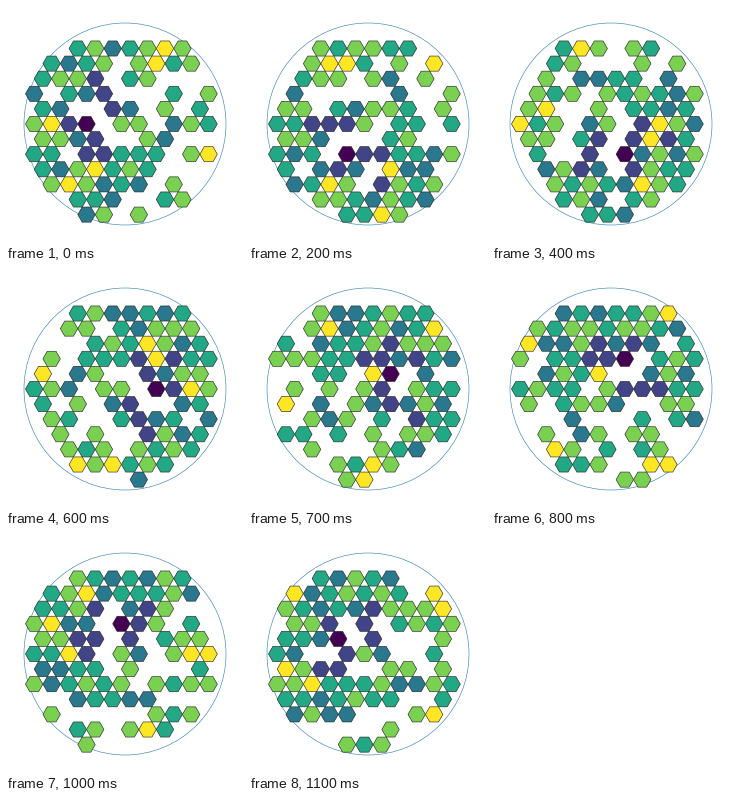
A matplotlib script for the animation above (1.2 s loop, 237x237 px).

```python
import numpy as np
import matplotlib.pyplot as plt
from matplotlib.animation import FuncAnimation
from matplotlib.collections import PolyCollection

SIZE, DPI = 237, 79
FRAMES = 12
HALF, ROW = 8.72, 15.1           # half a column and one row, in pixels
ORIGIN = np.array([115.4, 118.0])  # centre cell of the lattice
CENTRE = np.array([119.0, 118.0])  # pivot and disk centre
RADIUS = 101

# Nodes by level, in (half column, row) units around the pivot
root = [(-3.64, -.3)]
level1 = [(-3, -3), (-2, -2), (-1, -1), (-6, 0), (-2.8, 1), (-4.7, 2.35), (-2, 2)]
level2 = [(-1.5, -5.5), (-6.5, -3.5), (-10, -2), (-4, -2), (-7, -1), (1, -1),
          (6, 0), (-5, 1), (5, 1), (-6.5, 2.7), (-1.7, 4), (1.5, 4.5),
          (-1, 5), (-4.2, 5.7)]
level3 = [(-4.8, -5.4), (0, -5), (-8, -4), (-4, -4), (5, -4), (-9, -3),
          (.5, -2.5), (-6, -2), (6, -2), (-9, -1), (9, -1), (10, 0),
          (-10, 2), (-8, 2), (0, 2), (2, 2), (4, 2), (-9, 3), (-1, 3),
          (3, 3), (-1, 4), (-5, 5), (-3, 4.7), (5, 5)]
level4 = [(-3, -5), (3, -5), (6.5, -4.5), (-2, -4), (2, -4), (7.5, -3.5),
          (-6.8, -3.3), (-5, -3), (3, -3), (9, -2), (5, -1), (-9.6, 0),
          (0, 0), (2, 0), (8, 0), (-9, 1), (-7, 1), (3, 1), (8, 2), (-6, 3),
          (1, 3), (-7.5, 4.5), (-5, 4), (6, 4), (5.8, 4.6), (-2.5, 5.5),
          (2.2, 5.8)]
level5 = [(5, -5), (3.6, -4.5), (-9, 0), (-4, 3), (-7, 4), (9.5, 1.5)]

levels = [root, level1, level2, level3, level4, level5]
nodes = np.concatenate(levels) * (HALF, ROW)
depth = np.repeat(np.arange(6), [len(lv) for lv in levels])

cells = np.array([ORIGIN + (h * HALF, j * ROW)
                  for j in range(-5, 7) for h in range(-10, 11)
                  if (h + j) % 2 == 0])
cells = cells[np.hypot(*(cells - CENTRE).T) < 98.8]

corner = np.radians(np.arange(0, 360, 60))
hexagon = HALF * np.column_stack([np.cos(corner), np.sin(corner)])


def rotate(points, angle):
    c, s = np.cos(angle), np.sin(angle)
    return points @ np.array([[c, -s], [s, c]])


def snap(points):
    """Give each point the nearest cell still free, inner levels first."""
    free = np.ones(len(cells), bool)
    spots = []
    for p in points:
        dist = np.hypot(*(cells - p).T)
        k = np.argmin(np.where(free, dist, np.inf))
        free[k] = False
        spots.append(cells[k])
    return np.array(spots)


fig = plt.figure(figsize=(SIZE / DPI, SIZE / DPI), dpi=DPI, facecolor="white")
ax = fig.add_axes([0, 0, 1, 1])
ax.set(xlim=(0, SIZE), ylim=(SIZE, 0))
ax.axis("off")

px = 72 / DPI
ax.add_patch(plt.Circle(CENTRE, RADIUS, fill=False, ec="#1f77b4",
                        lw=0.55 * px, zorder=1))
tiles = PolyCollection([], facecolors=plt.cm.viridis(depth / 5),
                       edgecolors="#222222", linewidths=0.6 * px, zorder=2)
ax.add_collection(tiles, autolim=False)


def draw(i):
    spots = snap(CENTRE + rotate(nodes, 2 * np.pi * i / FRAMES))
    tiles.set_verts(spots[:, None] + hexagon)
    return [tiles]


anim = FuncAnimation(fig, draw, frames=FRAMES, interval=100, repeat=True,
                     repeat_delay=0)
plt.show()
```
